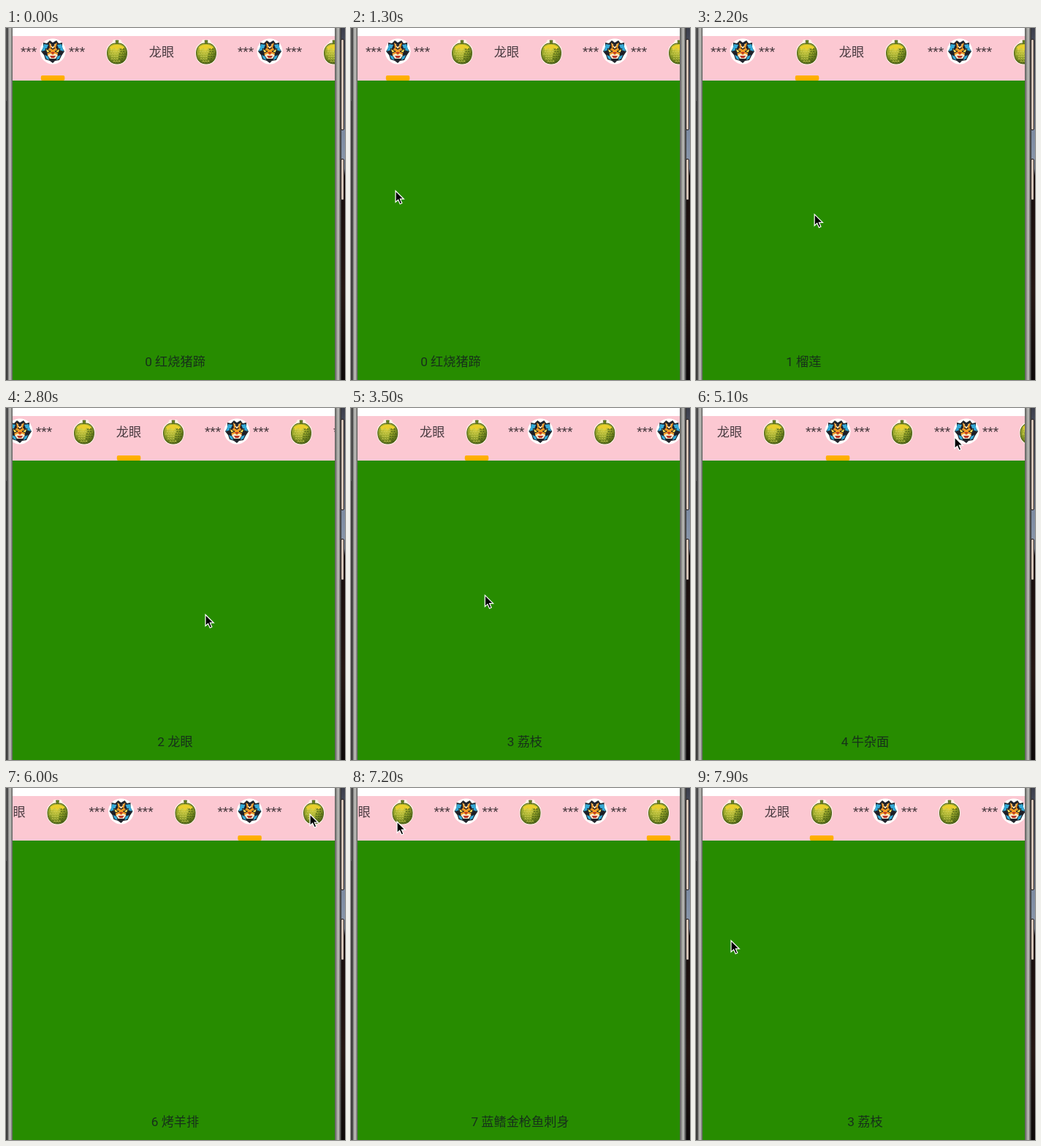
Write an HTML page that moves like this. It is 464x482 px and loops after 8000 ms.

```html
<!DOCTYPE html>
<html lang="zh">
<head>
<meta charset="utf-8">
<title>Tab pager</title>
<style>
  html, body { margin: 0; width: 100%; height: 100%; overflow: hidden; background: #fff; }
  svg { display: block; }
  text { font: 17.2px Roboto, "Noto Sans CJK SC", "Noto Sans CJK", sans-serif; text-anchor: middle; }
  #tabs text { fill: #493b40; }
  #pages text { fill: #17301a; }
</style>
</head>
<body>
<svg width="464" height="482" viewBox="0 0 464 482">
  <defs>
    <linearGradient id="left">
      <stop offset="0" stop-color="#777"/>
      <stop offset=".17" stop-color="#333"/>
      <stop offset=".32" stop-color="#777"/>
      <stop offset=".6" stop-color="#c4c4c0"/>
      <stop offset=".85" stop-color="#898986"/>
      <stop offset="1" stop-color="#565654"/>
    </linearGradient>
    <linearGradient id="right">
      <stop offset="0" stop-color="#5b5b59"/>
      <stop offset=".25" stop-color="#898986"/>
      <stop offset=".55" stop-color="#c4c4c0"/>
      <stop offset=".8" stop-color="#666"/>
      <stop offset="1" stop-color="#222"/>
    </linearGradient>
    <linearGradient id="backdrop" x2="0" y2="1">
      <stop offset="0" stop-color="#3c3f4b"/>
      <stop offset=".25" stop-color="#77859d"/>
      <stop offset=".4" stop-color="#8b98ab"/>
      <stop offset=".42" stop-color="#160d0d"/>
      <stop offset=".75" stop-color="#241512"/>
      <stop offset="1" stop-color="#0c0809"/>
    </linearGradient>
    <radialGradient id="rind" cx=".42" cy=".3" r=".75">
      <stop offset="0" stop-color="#d8cf3e"/>
      <stop offset=".5" stop-color="#97a52b"/>
      <stop offset="1" stop-color="#445c12"/>
    </radialGradient>
    <clipPath id="screen"><rect x="9" y="0" width="441.5" height="482"/></clipPath>
    <g id="fruit">
      <path d="M-5 -17H5L7 -13Q15 -9 15 1Q14 17 0 17.500Q-14 17 -15 1Q-15 -9 -7 -13Z" fill="#fff5e4"/>
      <path d="M0 -12C9 -13 13.500 -6 13.500 1C13.500 11 8 16 0 16C-8 16 -13.500 11 -13.500 1C-13.500 -6 -9 -13 0 -12Z" fill="url(#rind)" stroke="#4a5a16"/>
      <path d="M-10 -7Q0 -14 10 -7L7 -3L3 -6L0 -2L-4 -6L-8 -2Z" fill="#e9cf2c"/>
      <path d="M-1 -11L-2 -16L2 -16L1 -11" fill="#6c8a20" stroke="#39480f" stroke-width=".7"/>
      <g id="bumps"></g>
    </g>
    <g id="mask">
      <circle r="17.500" fill="#fff"/>
      <path d="M-13 -12L-8 -11L-4 -15L0 -12L5 -15L8 -11L13 -12L13 -5L16 0L12 6L9 12L3 13L0 16L-4 13L-10 11L-12 5L-16 0L-13 -5Z" fill="#20232b"/>
      <path d="M-12 -10L-6 -9L-9 -2L-15 0ZM12 -10L6 -9L9 -2L15 0ZM-11 5L-6 7L-5 12L-9 10ZM11 5L6 7L5 12L9 10Z" fill="#35a9d6"/>
      <path d="M-5 -12L0 -8L6 -12L4 -5L8 -1L6 6L0 9L-7 6L-8 -1L-4 -5Z" fill="#f29a25"/>
      <path d="M-4 -11L0 -7L4 -11L0 -3ZM-7 5L-3 3L0 5L3 3L7 5L4 10L-4 10Z" fill="#f7ead0"/>
      <path d="M-10 -4L-3 0L-8 2ZM10 -4L3 0L8 2Z" fill="#ffe45a" stroke="#1b1b20"/>
      <path d="M-3 1H3L0 4ZM-4 6H4L2 9H-2Z" fill="#b93527"/>
      <path d="M-2 -9L0 -7L2 -9M-3 -5L0 -3L3 -5M-12 2L-8 4M12 2L8 4" fill="none" stroke="#17191f" stroke-width="1.300"/>
    </g>
  </defs>

  <rect width="464" height="482" fill="#fff"/>
  <g clip-path="url(#screen)">
    <rect x="9" y="11" width="442" height="61" fill="#fcc8d2"/>
    <rect x="9" y="72" width="442" height="410" fill="#278c00"/>
    <g id="tabs"><rect id="bar" y="65" width="32.500" height="7" rx="2" fill="#ffaf00"/></g>
    <g id="pages"></g>
  </g>
  <rect width="9" height="482" fill="url(#left)"/>
  <path d="M0 100V482" stroke="#3a3a3a" stroke-width="1.500"/>
  <rect x="458" width="6" height="482" fill="url(#backdrop)"/>
  <rect x="450" width="9" height="482" fill="url(#right)"/>
  <g fill="#d3c2b5" stroke="#221b1b">
    <rect x="458.500" y="15.500" width="4" height="124" rx="1.500"/>
    <rect x="458.500" y="179.500" width="4" height="56" rx="1.500"/>
  </g>
  <path id="cursor" d="M0 0V15.500L3.600 12.200L6.200 18L8.800 16.800L6.300 11.200H11.300Z" fill="#000" stroke="#fff" stroke-width="1.200"/>
</svg>
<script>
const NS = "http://www.w3.org/2000/svg";
const LOOP = 8000, STEP = 100, PAGE = 443, MID = 231.5;
const $ = id => document.getElementById(id);

function add(parent, tag, attrs, label) {
  const el = document.createElementNS(NS, tag);
  for (const k in attrs) el.setAttribute(k, attrs[k]);
  if (label) el.textContent = label;
  parent.append(el);
  return el;
}

const names = ["红烧猪蹄", "榴莲", "龙眼", "荔枝", "牛杂面", "菠萝", "烤羊排", "蓝鳍金枪鱼刺身"];
const centers = [64, 152, 213, 274, 361, 449, 537, 624.5];
const scrolls = [0, 0, 45, 102, 167, 203.5, 203.5, 203.5];

// Rind texture: staggered rows of spikes
for (let row = 0; row < 6; row++) {
  const y = -3 + row * 3.3, half = 11.5 - Math.abs(row - 1.5) * 1.4;
  for (let x = -half + (row % 2) * 1.6; x < half; x += 3.4) {
    add($("bumps"), "path", {
      d: `M${x} ${y}l1.2 -1.8l1.2 1.8`, fill: "none",
      stroke: x < 2 ? "#d3d35a" : "#3d5312", "stroke-width": .8
    });
  }
}

const tabs = $("tabs");
centers.forEach((x, i) => {
  if (i === 2) return add(tabs, "text", { x, y: 38.5 }, names[i]);
  if (i % 2) return add(tabs, "use", { href: "#fruit", x, y: 33 });
  for (const dx of [-33, 33]) add(tabs, "text", { x: x + dx, y: 38 }, "***");
  add(tabs, "use", { href: "#mask", x, y: 32 });
});
const pages = names.map((name, i) => add($("pages"), "text", { y: 463 }, `${i} ${name}`));

const linear = u => u;
const out = u => 1 - (1 - u) ** 3;

// Keys: [time, value, easing into the key]
function track(keys, t) {
  let a = keys[0];
  for (const b of keys) {
    if (t < b[0]) {
      if (t <= a[0]) return a[1];
      return a[1] + (b[1] - a[1]) * (b[2] || linear)((t - a[0]) / (b[0] - a[0]));
    }
    a = b;
  }
  return a[1];
}

const pageKeys = [
  [1050, 0], [1300, .2145], [1450, .38], [1800, 1, out],
  [2050, 1], [2350, 1.38], [2700, 2, out],
  [2950, 2], [3250, 2.38], [3600, 3, out],
  [4100, 3], [4200, 3.05], [4400, 3.35], [4700, 4, out],
  [5200, 4], [5600, 6, out],
  [6100, 6], [6500, 7, out],
  [7400, 7], [7800, 3, out]
];

const picks = [[1450, 1], [2350, 2], [3250, 3], [4400, 4], [5200, 6], [6100, 7], [7400, 3]];
const selectKeys = list => {
  let last = 0;
  return [[0, list[0]], ...picks.flatMap(([t, i]) => {
    const pair = [[t, list[last]], [t + 300, list[i], out]];
    last = i;
    return pair;
  })];
};
const barKeys = selectKeys(centers);
const scrollKeys = selectKeys(scrolls);

const mouse = [
  [0, 475, 300], [500, 330, 250], [900, 235, 228], [1300, 61, 223], [1500, 52, 224],
  [2000, 285, 262], [2350, 70, 250], [2800, 273, 283], [2900, 285, 283],
  [3250, 75, 262], [3700, 270, 252], [3950, 250, 252], [4200, 87, 253], [4400, 62, 255],
  [4700, 190, 160], [5100, 354, 40], [5400, 354, 40], [5900, 416, 36],
  [6500, 416, 36], [7100, 63, 46], [7450, 63, 46], [7900, 48, 209]
];
const mouseX = mouse.map(([t, x]) => [t, x]);
const mouseY = mouse.map(([t, , y]) => [t, y]);

function draw(t) {
  const page = track(pageKeys, t);
  pages.forEach((el, i) => el.setAttribute("x", MID + (i - page) * PAGE));
  tabs.setAttribute("transform", `translate(${-track(scrollKeys, t)} 0)`);
  $("bar").setAttribute("x", track(barKeys, t) - 16.2);
  $("cursor").setAttribute("transform", `translate(${track(mouseX, t)} ${track(mouseY, t)})`);
}

const start = performance.now();
function frame() {
  const t = (performance.now() - start) % LOOP;
  draw(Math.floor(t / STEP) * STEP);
  requestAnimationFrame(frame);
}
frame();
</script>
</body>
</html>
```
